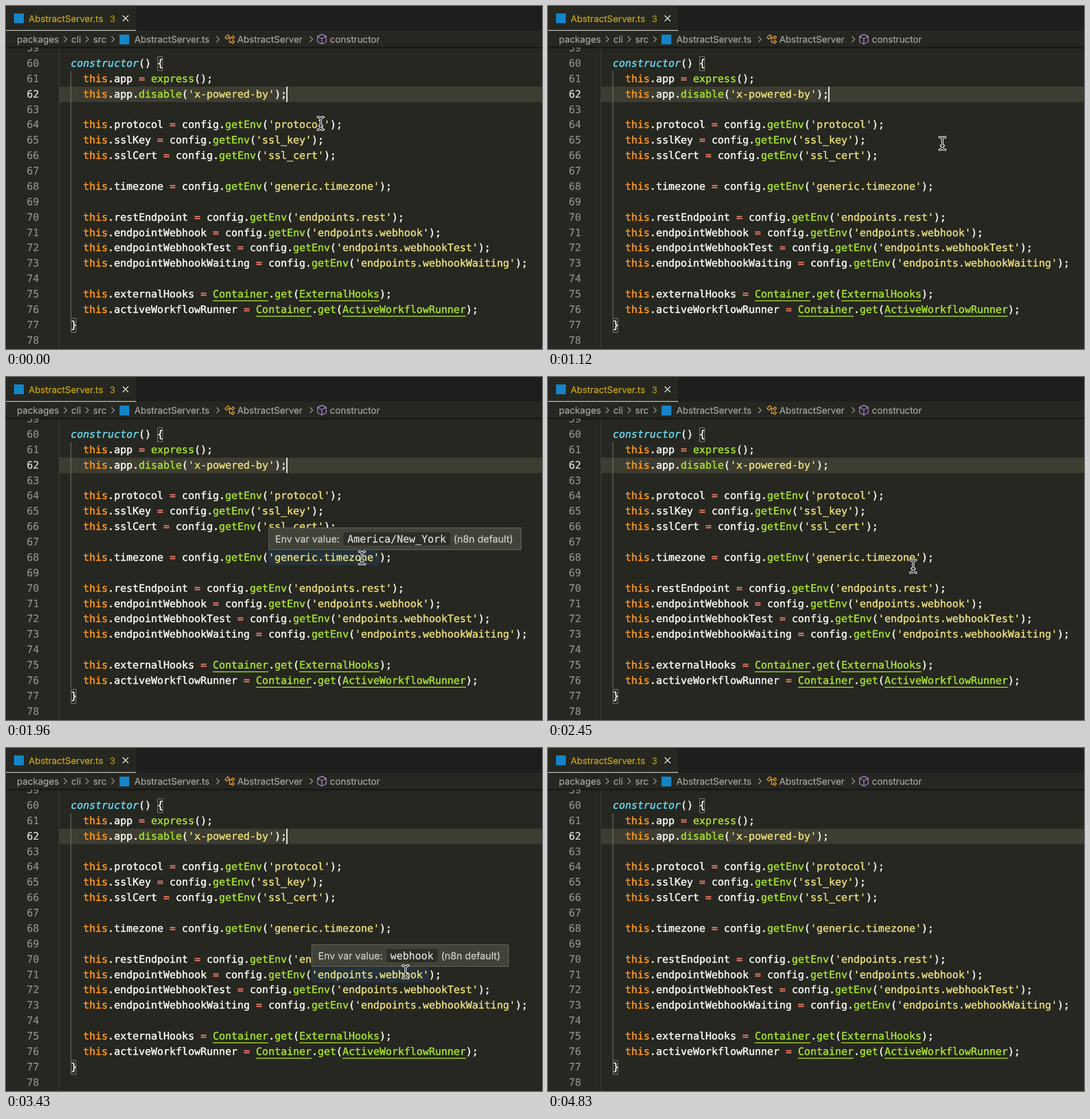
These frames come from a looping animation (935 px wide and 599 px high, 4900 ms). An HTML page with a canvas:

```html
<!DOCTYPE html>
<html>
<head>
<meta charset="utf-8">
<title>Editor hover</title>
<style>
  html, body { margin: 0; width: 100%; height: 100%; overflow: hidden; background: #262721; }
  canvas { display: block; }
</style>
</head>
<body>
<canvas id="stage" width="935" height="599"></canvas>
<script>
const ctx = document.getElementById('stage').getContext('2d');
const LOOP = 4900, STEP = 70;
const COL = 10.77, ROW = 26.88, LEFT = 113, FIRST = 60;
const MONO = '17.89px "DejaVu Sans Mono", monospace';
const UI = 'Inter, sans-serif';
const BG = '#262721', GREEN = '#a6e22e', WHITE = '#f8f8f2';

const code = `constructor() {
  this.app = express();
  this.app.disable('x-powered-by');

  this.protocol = config.getEnv('protocol');
  this.sslKey = config.getEnv('ssl_key');
  this.sslCert = config.getEnv('ssl_cert');

  this.timezone = config.getEnv('generic.timezone');

  this.restEndpoint = config.getEnv('endpoints.rest');
  this.endpointWebhook = config.getEnv('endpoints.webhook');
  this.endpointWebhookTest = config.getEnv('endpoints.webhookTest');
  this.endpointWebhookWaiting = config.getEnv('endpoints.webhookWaiting');

  this.externalHooks = Container.get(ExternalHooks);
  this.activeWorkflowRunner = Container.get(ActiveWorkflowRunner);
}
`.split('\n');

const rules = [
  [/^'[^']*'/, '#e8dc7c'],
  [/^this\b/, '#fd971f'],
  [/^=/, '#f4806c'],
  [/^constructor/, '#66d9ef', 'italic'],
  [/^(getEnv|get|express|disable)(?=\()/, GREEN],
  [/^(Container|ExternalHooks|ActiveWorkflowRunner)\b/, GREEN, 'underline'],
  [/^(\w+|.)/, WHITE]
];

// Each tip belongs to one string in the code.
const tips = [
  { from: 210, to: 840, line: 64, word: "'protocol'", value: 'http' },
  { from: 1610, to: 2450, line: 68, word: "'generic.timezone'", value: 'America/New_York' },
  { from: 3220, to: 4270, line: 71, word: "'endpoints.webhook'", value: 'webhook' }
];

// time, x, y
const pointerPath = [
  [0, 549, 205], [700, 549, 205], [1120, 688, 240], [1540, 621, 316], [2310, 621, 316],
  [2800, 702, 390], [3010, 702, 390], [3150, 697, 391], [4130, 697, 391], [4550, 735, 630]
];

const lineTop = n => 87.1 + (n - FIRST) * ROW;
const baseline = n => Math.round(105.9 + (n - FIRST) * ROW);

function rect(x, y, w, h, fill) {
  ctx.fillStyle = fill;
  ctx.fillRect(x, y, w, h);
}

// A thin outline gives the glyphs their slightly heavy look.
function glyphs(text, x, y, color, weight) {
  ctx.fillStyle = ctx.strokeStyle = color;
  ctx.lineWidth = weight;
  ctx.fillText(text, x, y);
  ctx.strokeText(text, x, y);
}

function label(text, x, y, size, color) {
  ctx.font = `${size}px ${UI}`;
  glyphs(text, x, y, color, 0.25);
}

function mono(text, x, y, color, { style = '', weight = 0.5 } = {}) {
  ctx.font = `${style} ${MONO}`;
  [...text].forEach((ch, i) => glyphs(ch, x + i * COL, y, color, weight));
}

function stroke(d, color, width = 1.3) {
  ctx.strokeStyle = color;
  ctx.lineWidth = width;
  ctx.stroke(new Path2D(d));
}

function drawGutter() {
  rect(92, 72, 1, 527, '#42433c');
  rect(93, lineTop(62), 842, ROW, '#3e3d32');
  rect(112.5, lineTop(61), 1.2, 16 * ROW, '#73746c');
  stroke('M264.5 88.5h8.5v24.5h-8.5zM113.5 545.5h8.5v24.5h-8.5z', '#8a8a83', 1);

  for (let n = FIRST - 1; n <= 78; n++)
    mono(String(n), 36.2, baseline(n), n === 62 ? '#e4e4df' : '#8f908a', { weight: 0.2 });
}

function drawCode() {
  code.forEach((text, i) => {
    const y = baseline(FIRST + i);
    for (let at = 0; at < text.length;) {
      const rest = text.slice(at);
      const [pattern, color, style] = rules.find(r => r[0].test(rest));
      const token = rest.match(pattern)[0], x = LEFT + at * COL;
      mono(token, x, y, color, { style: style === 'italic' ? style : '' });
      if (style === 'underline') rect(x, y + 5, token.length * COL, 1.5, color);
      at += token.length;
    }
  });
}

function drawHeader() {
  rect(0, 0, 935, 72, BG);
  rect(227, 0, 708, 43, '#1e1f1c');
  rect(0, 42, 227, 1.2, '#dededa');
  const shade = ctx.createLinearGradient(0, 71, 0, 76);
  shade.addColorStop(0, 'rgba(0,0,0,.5)');
  shade.addColorStop(1, 'rgba(0,0,0,0)');
  rect(0, 71, 935, 5, shade);

  rect(14, 13, 17, 17, '#1485c8');
  label('AbstractServer.ts', 39.5, 27.7, 15.9, '#c8a416');
  label('3', 181, 27.7, 15.5, '#b09418');
  stroke('M203.5 16.5l10 10m0-10l-10 10', '#eeeeea', 1.5);

  const crumbs = [['packages', 19], ['cli', 114], ['src', 152], ['AbstractServer.ts', 224],
    ['AbstractServer', 403.5], ['constructor', 565]];
  for (const [text, x] of crumbs) label(text, x, 64, 16, '#a3a49e');
  for (const x of [104, 142, 187, 370, 533]) stroke(`M${x - 3} 53l5 5-5 5`, '#a3a49e');
  rect(198, 50, 17, 17, '#1485c8');
  stroke('M382 55l5-5 3 3-5 5zM388 55.5h5M390 55.5v8h3M393 55l3-3 2.5 2.5-3 3zM393 63l3-3 2.5 2.5-3 3z',
    '#ee9d28', 1.4);
  stroke('M551 49.5l7.5 3.5v9.5l-7.5 4-7.5-4v-9.5zM543.5 53l7.5 4 7.5-4M551 57v9.5', '#b180d7', 1.4);
}

function wordStart(tip) {
  return LEFT + code[tip.line - FIRST].indexOf(tip.word) * COL;
}

function drawTip(tip) {
  const x = Math.round(wordStart(tip)) + 0.5, y = Math.round(lineTop(tip.line) - 39.3) + 0.5;
  const chip = tip.value.length * COL + 14;
  const after = x + 130 + chip + 6;
  const width = Math.round(after + 118 - x), base = y + 25.5;
  rect(x, y, width, 38, '#414339');
  ctx.strokeStyle = '#6d6c5c';
  ctx.lineWidth = 1;
  ctx.strokeRect(x, y, width, 38);
  label('Env var value:', x + 11, base, 17, '#cfcfc8');
  ctx.beginPath();
  ctx.roundRect(x + 130, y + 7.5, chip, 23, 3);
  ctx.fillStyle = '#2d2e28';
  ctx.fill();
  mono(tip.value, x + 137, base, '#dcdcd6', { weight: 0.3 });
  label('(n8n default)', after, base, 17, '#cfcfc8');
}

function drawPointer(t) {
  const i = pointerPath.findIndex(p => p[0] > t);
  if (i < 0) return;
  const [t0, x0, y0] = pointerPath[i - 1], [t1, x1, y1] = pointerPath[i];
  const u = (t - t0) / (t1 - t0), e = u * u * (3 - 2 * u);
  ctx.save();
  ctx.translate(x0 + (x1 - x0) * e, y0 + (y1 - y0) * e);
  ctx.lineCap = 'round';
  const beam = 'M-5-11Q-1-11 0-8Q1-11 5-11M0-8V8M-5 11Q-1 11 0 8Q1 11 5 11M-2.5 4H2.5';
  stroke(beam, '#f4f4f4', 4);
  stroke(beam, '#151515', 1.5);
  ctx.restore();
}

function draw(now) {
  const t = Math.floor(now % LOOP / STEP) * STEP;
  const tip = tips.find(p => t >= p.from && t < p.to);
  ctx.textRendering = 'geometricPrecision';
  ctx.lineJoin = 'round';
  rect(0, 0, 935, 599, BG);
  drawGutter();
  if (tip) rect(wordStart(tip), lineTop(tip.line), tip.word.length * COL, ROW, '#25323a');
  drawCode();
  if ((t + 175) % 1050 < 525) rect(489, lineTop(62), 2, ROW, WHITE);
  drawHeader();
  if (tip) drawTip(tip);
  drawPointer(t);
  requestAnimationFrame(tick);
}

const start = performance.now();
const tick = () => draw(performance.now() - start);
tick();
</script>
</body>
</html>
```
